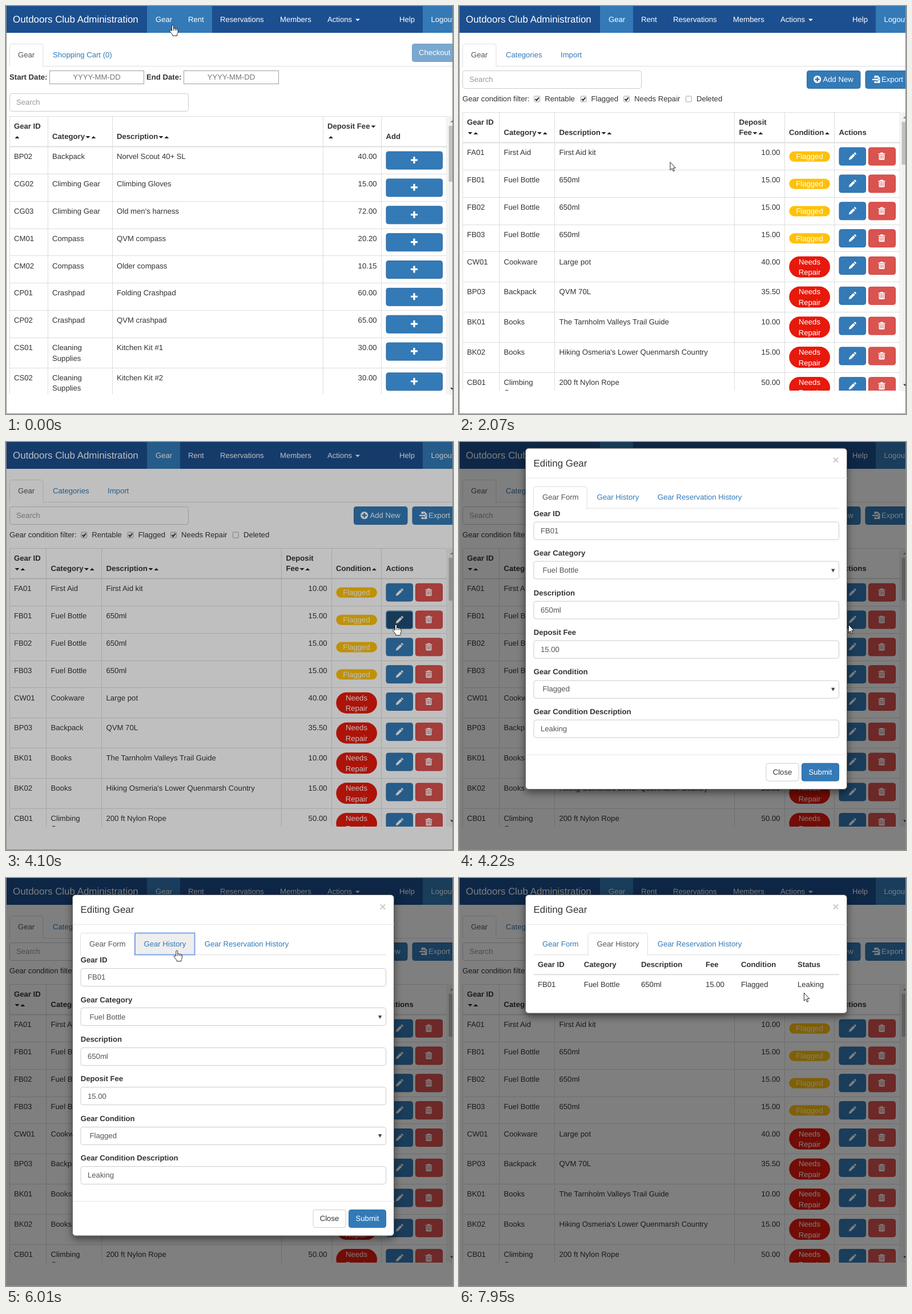
These frames come from a looping animation (783 px wide and 715 px high, 8000 ms). An HTML page:

```html
<!DOCTYPE html>
<html lang="en">
<head>
<meta charset="utf-8">
<title>Gear administration</title>
<style>
html, body { margin: 0; width: 100%; height: 100%; overflow: hidden; background: #fff; }
svg { display: block; width: 783px; height: 715px; }
text { font: 13.15px "Liberation Sans", Arial, sans-serif; fill: #333; text-rendering: geometricPrecision; white-space: pre; }
.b { font-weight: 700; }
.w { fill: #fff; }
.link { fill: #337ab7; }
.tab { fill: #555; }
.hint { fill: #999; }
.m { text-anchor: middle; }
.e { text-anchor: end; }
.big { font-size: 16.9px; }
.panel { filter: drop-shadow(0 5px 7px rgba(0,0,0,.5)); }
</style>
</head>
<body>
<svg id="stage" viewBox="0 0 783 715"></svg>
<script>
const BLUE = '#337ab7', LINE = '#ddd';

const text = (x, y, s, cls = '') => `<text x="${x}" y="${y}" class="${cls}">${s}</text>`;
const rect = (x, y, w, h, fill, more = '') =>
  `<rect x="${x}" y="${y}" width="${w}" height="${h}" fill="${fill}" ${more}/>`;
const path = (d, fill, more = '') => `<path d="${d}" fill="${fill}" ${more}/>`;
const at = (x, y, s) => `<g transform="translate(${x} ${y})">${s}</g>`;
const group = (id, s) => `<g id="${id}">${s}</g>`;
const hline = (x, y, x2, c = LINE, h = 1) => rect(x, y, x2 - x, h, c);
const box = (x, y, w, h, fill, stroke, r = 3.8) =>
  rect(x + .5, y + .5, w - 1, h - 1, fill, `stroke="${stroke}" rx="${r}"`);
const button = (x, y, w, fill = BLUE, edge = '#2e6da4') => box(x, y, w, 32, fill, edge);
const field = (x, y, w) => box(x, y, w, 32, '#fff', '#ccc');
const down = (x, y) => path(`M${x - 4} ${y - 2}h8l-4 4z`, '#222');
const up = (x, y) => path(`M${x - 4} ${y + 2}h8l-4-4z`, '#222');
const sort = (x, y) => down(x, y) + up(x + 9.8, y);
const tabBox = (x, y, w) =>
  path(`M${x + .5} ${y + 40}V${y + 4.5}q0-4 4-4H${x + w - 4.5}q4 0 4 4V${y + 40}`, '#fff', `stroke="${LINE}"`);

const plus = path('M-1.6-6h3.2v4.4h4.4v3.2h-4.4v4.4h-3.2v-4.4h-4.4v-3.2h4.4z', '#fff');
const pencil = path('M-6.5 6.5l1-4 7-7 3 3-7 7zM2.3-5.3l1-1q.8-.7 1.6 0l1.4 1.4q.7.8 0 1.6l-1 1z', '#fff');
const trash = path('M-6-5h3.6v-1.5h4.8V-5H6v1.6H-6zM-5-2.6H5V5q0 1.5-1.5 1.5h-7Q-5 6.5-5 5z', '#fff') +
  path('M-2.6-1.4v6M0-1.4v6M2.6-1.4v6', 'none', 'stroke="#d9534f"');
const exportIcon = path('M-3.5-6.5h6l4 4v9h-10V3H1v2l4-4.5L1-4v2.3h-4.5zM-7-.8h8.8v-2l3 3.2-3 3.2v-2H-7z', '#fff') +
  path('M-7.5 2.7H1v2l4-4.4-4-4.4v2h-4.5', 'none', `stroke="${BLUE}" stroke-width=".8"`);
const editButton = (y, fill, edge) => button(665.5, y, 47.5, fill, edge) + at(689.3, y + 15.6, pencil);

// Grid lines, and rows laid out from the header down
function table(top, bottom, cols, head, rows, drawRow) {
  let s = hline(6, top, 772.5), y = top + 53.3;
  s += hline(6, y - .8, 772.5, LINE, 1.9) + head;
  for (const row of rows) {
    const h = row.tall ? 52.8 : 47.85;
    s += drawRow(row.cells, y, row.tall) + hline(6, Math.round(y + h - .3), 772.5);
    y += h;
  }
  s += cols.map(x => rect(x, top, 1, 500, LINE)).join('');
  return `<clipPath id="c${top}">${rect(0, 0, 783, bottom)}</clipPath><g clip-path="url(#c${top})">${s}</g>`;
}

const scrollbar = (top, bottom, thumb) => rect(774.5, top, 8, bottom - top, '#f1f1f1') +
  rect(775.5, top + 17, 7, thumb, '#c1c1c1') +
  path(`M778 ${top + 11}h5v-3.5h-1.5z`, '#888') + path(`M778 ${bottom - 12}h5v3.5h-1.5z`, '#333');

const tabs = (...items) => hline(6, 105, 782) + tabBox(6, 66, 59.5) +
  text(21, 89.7, 'Gear', 'tab') + items.map(([x, s]) => text(x, 89.7, s, 'link')).join('');

const parse = src => src.split('\n').map(line => {
  const cells = line.split('|');
  return { cells, tall: /Supplies|Repair/.test(line) };
});

function rentPage() {
  const rows = parse(`BP02|Backpack|Norvel Scout 40+ SL|40.00
CG02|Climbing Gear|Climbing Gloves|15.00
CG03|Climbing Gear|Old men's harness|72.00
CM01|Compass|QVM compass|20.20
CM02|Compass|Older compass|10.15
CP01|Crashpad|Folding Crashpad|60.00
CP02|Crashpad|QVM crashpad|65.00
CS01|Cleaning Supplies|Kitchen Kit #1|30.00
CS02|Cleaning Supplies|Kitchen Kit #2|30.00`);
  const head = text(14, 214.5, 'Gear ID', 'b') + up(19.5, 230) +
    text(81, 233, 'Category', 'b') + sort(143.5, 230) +
    text(194, 233, 'Description', 'b') + sort(271.5, 230) +
    text(563, 214.5, 'Deposit Fee', 'b') + down(643.5, 211.5) + up(569, 230) +
    text(665.5, 233, 'Add', 'b');
  const drawRow = ([id, cat, desc, fee], y, tall) => {
    const words = tall ? cat.split(' ') : [cat];
    return text(14, y + 21.8, id) + words.map((w, i) => text(81, y + 21.8 + i * 18.6, w)).join('') +
      text(194, y + 21.8, desc) + text(649.5, y + 21.8, fee, 'e') +
      button(665.5, y + 8.3, 99.5) + at(715, y + 23.7, plus);
  };
  const date = (x, w) => rect(x + .5, 113.5, w - 1, 23, '#fff', 'stroke="#a0a0a0"') +
    `<text x="${x + w / 2}" y="129" class="m" style="fill:#757575">YYYY-MM-DD</text>`;
  return tabs([82, 'Shopping Cart (0)']) +
    `<g opacity=".65">${button(711, 66, 90)}</g>` + text(723, 86.3, 'Checkout', 'w') +
    text(6, 129, 'Start Date:', 'b') + date(76, 166) + text(246, 129, 'End Date:', 'b') + date(311, 167) +
    field(6, 153, 314) + text(18, 173.3, 'Search', 'hint') +
    table(193, 680.5, [6, 73, 186, 555, 657, 772], head, rows, drawRow) + scrollbar(193, 681, 98);
}

function gearPage() {
  const rows = parse(`FA01|First Aid|First Aid kit|10.00|Flagged
FB01|Fuel Bottle|650ml|15.00|Flagged
FB02|Fuel Bottle|650ml|15.00|Flagged
FB03|Fuel Bottle|650ml|15.00|Flagged
CW01|Cookware|Large pot|40.00|Needs Repair
BP03|Backpack|QVM 70L|35.50|Needs Repair
BK01|Books|The Tarnholm Valleys Trail Guide|10.00|Needs Repair
BK02|Books|Hiking Osmeria's Lower Quenmarsh Country|15.00|Needs Repair
CB01|Climbing Gear|200 ft Nylon Rope|50.00|Needs Repair`);
  const head = text(14, 207.8, 'Gear ID', 'b') + sort(19.5, 223) +
    text(78.5, 226.3, 'Category', 'b') + sort(141, 223) +
    text(175.5, 226.3, 'Description', 'b') + sort(253.5, 223) +
    text(490.5, 207.8, 'Deposit', 'b') + text(490.5, 226.3, 'Fee', 'b') + sort(518.5, 223) +
    text(578, 226.3, 'Condition', 'b') + up(645, 223) + text(665.5, 226.3, 'Actions', 'b');
  const drawRow = ([id, cat, desc, fee, state], y, tall) => {
    const cats = tall ? cat.split(' ') : [cat], base = y + 21.8;
    const badge = tall
      ? rect(578.3, y + 8, 71.7, 37, '#e6190c', 'rx="18.5"') +
        state.split(' ').map((w, i) => text(614, base + i * 18.6, w, 'w m')).join('')
      : rect(578.3, y + 15.5, 71.7, 18, '#ffc107', 'rx="9"') + text(614, y + 29, state, 'w m');
    return text(14, base, id) + cats.map((w, i) => text(78.5, base + i * 18.6, w)).join('') +
      text(175.5, base, desc) + text(562.5, base, fee, 'e') + badge + editButton(y + 8.3) +
      button(717, y + 8.3, 48, '#d9534f', '#d43f3a') + at(740.5, y + 23.9, trash);
  };
  const check = (x, s, on) => box(x - 5.5, 157.5, 11, 11, on ? '#f4f4f4' : '#fff', '#a5a5a5', 1.5) +
    (on ? path(`M${x - 3} 163l2.2 2.4 4-5`, 'none', 'stroke="#333" stroke-width="2"') : '') +
    text(x + 13.6, 167, s);
  return tabs([82, 'Categories'], [178, 'Import']) +
    field(6, 113, 314) + text(18, 133.3, 'Search', 'hint') +
    button(609, 113, 94.5) + '<circle cx="627.7" cy="128.5" r="6.6" fill="#fff"/>' +
    path('M623.7 128.5h8M627.7 124.5v8', 'none', `stroke="${BLUE}" stroke-width="2.4"`) +
    text(637.5, 133.3, 'Add New', 'w') +
    button(711.5, 113, 90) + at(731, 128.5, exportIcon) + text(740, 133.3, 'Export', 'w') +
    text(6, 167, 'Gear condition filter:') + check(136.7, 'Rentable', 1) + check(218, 'Flagged', 1) +
    check(293.5, 'Needs Repair', 1) + check(402.3, 'Deleted', 0) +
    table(186, 674, [6, 70, 167, 482, 570, 657, 772], head, rows, drawRow) + scrollbar(186, 674.5, 75) +
    group('hot', editButton(295.9, '#286090', '#204d74')) +
    group('pressed', editButton(295.9, '#204d74', '#6ea2e0'));
}

function nav() {
  const items = [[262, 'Gear'], [319, 'Rent'], [375, 'Reservations'], [480, 'Members'], [563, 'Actions'], [689, 'Help'], [744.5, 'Logout']];
  return rect(0, 0, 783, 47, '#1c4f8f') + rect(247, 0, 58, 47, BLUE) +
    group('rentItem', rect(305, 0, 56, 47, BLUE)) + rect(730, 0, 53, 47, BLUE) +
    text(12, 29.3, 'Outdoors Club Administration', 'w big') +
    items.map(([x, s]) => text(x, 28, s, 'w')).join('') + path('M612 22.5h8l-4 4z', '#fff');
}

function modal() {
  const fields = [['Gear ID', 'FB01'], ['Gear Category', 'Fuel Bottle', 1], ['Description', '650ml'],
    ['Deposit Fee', '15.00'], ['Gear Condition', 'Flagged', 1], ['Gear Condition Description', 'Leaking']];
  const form = fields.map(([label, value, select], i) => {
    const y = 158 + i * 69.4;
    return text(130.7, y - 9.8, label, 'b') + field(130.5, Math.round(y), 535.5) +
      text(select ? 146.5 : 143, y + 20.3, value, 'tab') +
      (select ? path(`M652 ${y + 13.5}h6.4l-3.2 6z`, '#444') : '');
  }).join('') + hline(117, 566, 680, '#e5e5e5') +
    box(537.5, 581, 58, 32, '#fff', '#ccc') + text(566.5, 601, 'Close', 'm') +
    button(600, 581, 66) + text(633, 601, 'Submit', 'w m');
  const cols = [[138, 'Gear ID', 'FB01'], [218.7, 'Category', 'Fuel Bottle'], [319, 'Description', '650ml'],
    [432, 'Fee', '15.00'], [494, 'Condition', 'Flagged'], [593, 'Status', 'Leaking']];
  const history = cols.map(([x, h, v]) => text(x, 156, h, 'b') + text(x, 191, v)).join('') +
    hline(131, 168.3, 666, LINE, 1.9);
  return '<rect id="panel" class="panel" x="116.5" y="29.5" width="563" rx="5.5" fill="#fff" stroke="#666"/>' +
    text(130.5, 61.3, 'Editing Gear', 'big') +
    '<text x="660" y="56.5" class="b m" style="font-size:19.5px;fill:#ccc">×</text>' +
    hline(117, 81, 680, '#e5e5e5') + hline(131, 134, 666) +
    group('onForm', tabBox(130, 96, 94.5)) +
    group('hoverTab', path('M226 134V100q0-4 4-4h97q4 0 4 4v34z', '#eee')) +
    group('onHistory', tabBox(225.5, 96, 105.5)) +
    group('ring', rect(226, 96.5, 104.5, 38, 'none', 'stroke="#7ca6ea" stroke-width="2"')) +
    `<text id="formTab" x="146" y="119.8">Gear Form</text>` +
    `<text id="historyTab" x="241.5" y="119.8">Gear History</text>` +
    text(347.7, 119.8, 'Gear Reservation History', 'link') +
    group('form', form) + group('history', history);
}

const outline = 'stroke="#111" stroke-width=".9" stroke-linejoin="round"';
const arrow = path('M.4.6V14.6L3.6 11.6 5.8 16.6 7.8 15.8 5.7 10.9H9.9Z', '#fff', outline);
const hand = at(1, 0, path('M-1.5 10.3V2a1.5 1.5 0 0 1 3 0V6.6c.5-1 2.6-.8 3 .4.6-.8 2.3-.6 2.7.6.7-.6 2.1-.2 2.1 1.2V12c0 2-1.2 3.2-1.6 5V19.2H-.2V17.4C-1.5 15.5-4 13-5.2 11-5.8 9.6-4.2 8.8-3 9.8Z', '#fff', outline) +
  path('M1.5 6.6V10M4.5 7V10.2M7.2 7.6V10.4', 'none', outline));

document.getElementById('stage').innerHTML = rect(0, 0, 783, 715, '#fff') + nav() +
  group('rent', rentPage()) + group('gear', gearPage()) +
  group('backdrop', rect(0, 0, 783, 715, '#000')) + group('modal', modal()) +
  path('M.5 0V714.5H782.5V0', 'none', 'stroke="#8a8a8a"') +
  group('cursor', group('arrow', arrow) + group('hand', hand));

const el = {};
document.querySelectorAll('#stage [id]').forEach(n => el[n.id] = n);
const show = (id, on) => el[id].style.display = on ? '' : 'none';
const fade = (id, o) => el[id].setAttribute('opacity', o);

// first step, last step, number of steps, end point
const moves = [
  [1110, 2070, 8, 369.5, 273], [2220, 2460, 3, 369.5, 306], [2740, 3670, 8, 682, 319.5],
  [4650, 5610, 8, 302, 128], [5730, 5730, 1, 298.3, 126.7], [6680, 6830, 2, 297, 132.3],
  [7110, 7110, 1, 286, 140], [7250, 7950, 6, 604, 200.7]
];

function pointer(t) {
  let x = 291, y = 33;
  for (const [t0, t1, n, x1, y1] of moves) {
    if (t < t0) break;
    const step = t >= t1 ? n : Math.floor((t - t0) / (t1 - t0) * (n - 1)) + 1;
    const p = step / n, e = p * p * (3 - 2 * p);
    x += (x1 - x) * e;
    y += (y1 - y) * e;
  }
  return [x, y];
}

function draw(t) {
  const [x, y] = pointer(t);
  const first = t < 430, open = t >= 4220, switched = t >= 6130, small = t >= 6280;
  const overEdit = t >= 2740 && !open && x >= 666;
  const overTab = t >= 4650 && t < 6400 && x < 331 && y < 135;
  show('rent', first);
  show('rentItem', first);
  show('gear', !first);
  show('hot', overEdit && t < 3950);
  show('pressed', overEdit && t >= 3950);

  fade('backdrop', t < 4100 ? 0 : open ? .5 : .25);
  show('modal', open);
  el.modal.setAttribute('transform', `translate(0 ${t < 4370 ? -18.4 : 0})`);
  el.panel.setAttribute('height', small ? 207.5 : 597.5);
  show('onForm', !switched);
  show('onHistory', switched);
  show('hoverTab', overTab && !switched);
  show('ring', t >= 6010 && t < 6400);
  el.formTab.setAttribute('class', switched ? 'link' : 'tab');
  el.historyTab.setAttribute('class', switched ? 'tab' : 'link');
  show('form', !small);
  fade('form', switched ? .5 : 1);
  show('history', small);
  fade('history', t < 6400 ? .5 : 1);

  const pointing = t < 1110 || overEdit || overTab;
  show('hand', pointing);
  show('arrow', !pointing);
  el.cursor.setAttribute('transform', `translate(${x} ${y})`);
}

const begin = performance.now();
function tick() {
  draw((performance.now() - begin) % 8000);
  requestAnimationFrame(tick);
}
tick();
</script>
</body>
</html>
```
